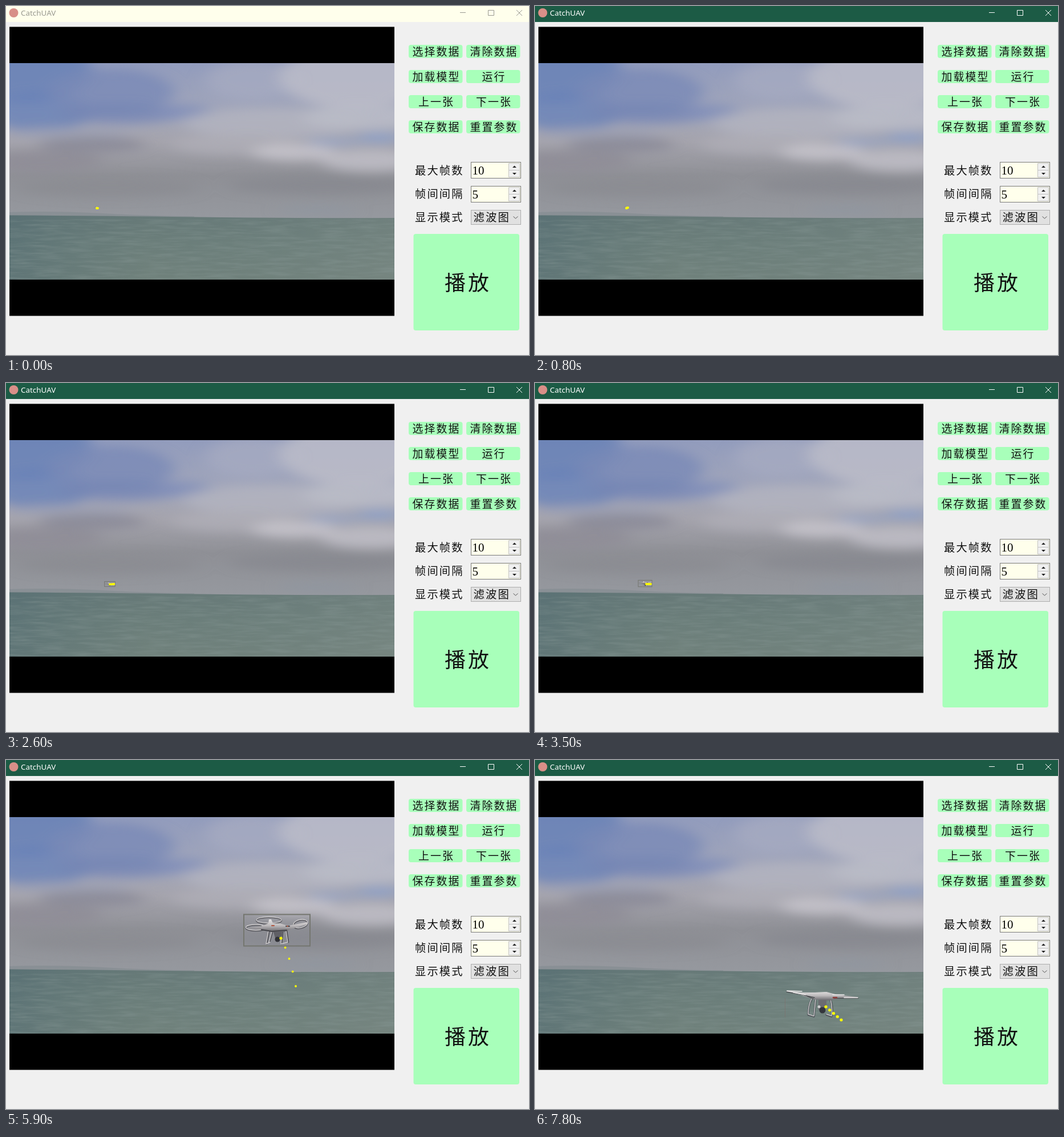
An HTML page for the animation above (8 s loop, 917 by 611 pixels).

```html
<!DOCTYPE html>
<html lang="zh-CN">
<head>
<meta charset="utf-8">
<title>CatchUAV</title>
<style>
html, body { margin: 0; width: 100%; height: 100%; overflow: hidden; background: #f0f0f0; }
svg { display: block; }
.cjk { font-family: "Noto Sans CJK SC", "Noto Sans CJK", sans-serif; font-weight: 300; fill: #111; }
.num { font: 21px "Liberation Serif", serif; }
.title { font: 13.4px "Noto Sans", sans-serif; }
</style>
</head>
<body>
<svg id="stage" width="917" height="611" viewBox="0 0 917 611">
  <defs>
    <clipPath id="photo"><rect x="6" y="100" width="675" height="379"/></clipPath>
    <filter id="soft" x="-60%" y="-100%" width="220%" height="300%"><feGaussianBlur stdDeviation="15 9"/></filter>
    <filter id="waves" x="0" y="0" width="100%" height="100%">
      <feTurbulence type="fractalNoise" baseFrequency=".02 .22" numOctaves="3" seed="4"/>
      <feColorMatrix values="0 0 0 0 .25  0 0 0 0 .32  0 0 0 0 .31  1.6 0 0 0 -.62"/>
    </filter>
    <linearGradient id="sky" x2="0" y2="1">
      <stop offset="0" stop-color="#929cbd"/>
      <stop offset=".33" stop-color="#a3a7ba"/>
      <stop offset=".5" stop-color="#a5a4ad"/>
      <stop offset=".72" stop-color="#8f9096"/>
      <stop offset="1" stop-color="#96999f"/>
    </linearGradient>
    <linearGradient id="sea" x2="0" y2="1">
      <stop offset="0" stop-color="#687a78"/>
      <stop offset=".45" stop-color="#6e807b"/>
      <stop offset="1" stop-color="#73837c"/>
    </linearGradient>
    <linearGradient id="seaSide">
      <stop offset="0" stop-color="#4f6a72" stop-opacity=".55"/>
      <stop offset=".35" stop-color="#5c7476" stop-opacity=".15"/>
      <stop offset="1" stop-color="#7b8985" stop-opacity=".4"/>
    </linearGradient>
    <linearGradient id="shell" x2="0" y2="1">
      <stop offset="0" stop-color="#e6e4e4"/>
      <stop offset=".5" stop-color="#bdbabc"/>
      <stop offset="1" stop-color="#66656a"/>
    </linearGradient>
    <path id="water" d="M6 366.5Q130 367 330 369.5T681 371V480H6Z"/>
  </defs>
  <rect width="917" height="611" fill="#f0f0f0"/>
  <rect x="6" y="36.5" width="675" height="506"/>
  <g clip-path="url(#photo)">
    <rect x="6" y="99" width="675" height="275" fill="url(#sky)"/>
    <g id="clouds" filter="url(#soft)"/>
    <path d="M6 361Q80 358 170 363T330 368V372H6Z" fill="#838b90" opacity=".6"/>
    <use href="#water" fill="url(#sea)"/>
    <use href="#water" fill="url(#seaSide)"/>
    <rect x="6" y="373" width="675" height="107" filter="url(#waves)" opacity=".5"/>

    <rect id="box" fill="none"/>
    <g id="guarded" fill="none" stroke-linecap="round" stroke-linejoin="round">
      <g id="guards" stroke="#58585e" stroke-width="2.6">
        <ellipse cx="438" cy="294" rx="17.5" ry="5"/>
        <ellipse cx="461" cy="281" rx="22" ry="5.5"/>
        <ellipse cx="516" cy="287.5" rx="13" ry="7" transform="rotate(-13 516 287)"/>
      </g>
      <g stroke="#d2d0d1" stroke-width="1.4">
        <ellipse cx="438" cy="293" rx="17.5" ry="5"/>
        <ellipse cx="461" cy="280" rx="22" ry="5.5"/>
        <ellipse cx="516" cy="286.5" rx="13" ry="7" transform="rotate(-13 516 286)"/>
      </g>
      <path d="M461 300L457 322M467 301L462 319M492 299L495 319M485 301L483 322" stroke="#4c4c52" stroke-width="2.6"/>
      <path d="M460 300L456 322M466 301L461 319M491 299L494 319M484 301L482 322M456 322L463 319M482 322L494 319" stroke="#cbc9cb" stroke-width="1.4"/>
      <path d="M424 294L447 291L460 286L461 279H465L468 286L480 286L494 290L528 284L529 287L500 296L488 301L465 301L448 297Z" fill="url(#shell)"/>
      <path d="M448 297L466 300L492 298M491 291H497" stroke="#45454a" stroke-width="2"/>
      <path d="M466 290H470M493 291H494" stroke="#b2563f" stroke-width="2"/>
      <path d="M469 301H485L483 312H472Z" fill="#606066"/>
      <circle cx="476" cy="314" r="4.5" fill="#303137"/>
    </g>
    <g id="bare" fill="none" stroke-linecap="round" stroke-linejoin="round">
      <path d="M485 419Q479 429 479 446L489 449M492 420L489 449M518 420Q523 432 520 449L511 446" stroke="#4b4f56" stroke-width="3.2"/>
      <path d="M485 418Q479 429 479 445L488 448M492 419L489 448M518 419Q522 432 520 448L511 445" stroke="#c9c8c9" stroke-width="1.5"/>
      <path d="M441 404L467 407L491 407L511 406L530 411L566 415V418L535 418L517 421L488 419L465 411L441 406Z" fill="url(#shell)"/>
      <path d="M441 406L470 411L488 418M472 412L490 416M524 417H567" stroke="#484c4f" stroke-width="1.3"/>
      <path d="M442 404L468 405M453 407L474 411M522 411H542M542 416H566" stroke="#eeecec" stroke-width="1.5"/>
      <path d="M523 416H529" stroke="#8d3935" stroke-width="2.5"/>
      <path d="M497 420H511V432L505 438H497Z" fill="#6b6c71"/>
      <circle cx="504" cy="438" r="5.5" fill="#34363c"/>
      <circle cx="498" cy="432" r="2.5" fill="#cfced0"/>
      <path d="M438.5 417V450" stroke="#806f6c" opacity=".6"/>
    </g>
    <g id="dots" fill="#ff0"/>
  </g>
  <rect id="bar" width="917" height="28"/>
  <circle cx="13.5" cy="12" r="8" fill="#d88f88"/>
  <text id="caption" class="title" x="26" y="17">CatchUAV</text>
  <path id="controls" d="M796 11.5H806M845.5 7.5H855.5V16.5H845.5ZM895 7L905 17M905 7L895 17" fill="none"/>
  <g id="panel"/>
</svg>
<script>
const LOOP = 8000;
const GREEN = '#a8ffba', RED = '#e6402e';
const $ = id => document.getElementById(id);

function set(node, attrs) {
  for (const key in attrs) node.setAttribute(key, attrs[key]);
}
function add(parent, tag, attrs, text) {
  const node = document.createElementNS('http://www.w3.org/2000/svg', tag);
  set(node, attrs);
  if (text) node.textContent = text;
  parent.append(node);
  return node;
}

// Soft cloud masses: cx, cy, rx, ry, colour
[
  [30, 110, 120, 60, '#6680b6'],
  [60, 185, 90, 36, '#6a83b8'],
  [185, 150, 110, 40, '#7a8ab7'],
  [200, 188, 110, 18, '#7686b5'],
  [310, 185, 50, 14, '#8290ba'],
  [430, 130, 80, 35, '#a6abc1'],
  [610, 125, 130, 55, '#bfbeca'],
  [470, 205, 160, 26, '#b3b4c0'],
  [630, 195, 110, 22, '#bcbdc9'],
  [110, 222, 110, 10, '#9da1b5'],
  [400, 242, 110, 18, '#b0aeb7'],
  [575, 238, 50, 8, '#98a5c6'],
  [655, 231, 40, 10, '#8da0cb'],
  [505, 256, 75, 15, '#c8c6ce'],
  [640, 270, 90, 20, '#c2c1ca'],
  [150, 243, 95, 14, '#898996'],
  [60, 272, 110, 18, '#8e8d96'],
  [560, 314, 170, 16, '#87898f'],
  [180, 318, 160, 16, '#8b8c92'],
  [545, 358, 70, 6, '#8e96a2']
].forEach(([cx, cy, rx, ry, fill]) =>
  add($('clouds'), 'ellipse', { cx, cy, rx, ry, fill, opacity: .8 }));

const panel = $('panel');
const rect = (x, y, width, height, fill, more) =>
  add(panel, 'rect', { x, y, width, height, fill, ...more });

// Characters sit on a fixed pitch, a little wider than the glyphs
function label(text, x, y, pitch) {
  const size = pitch * .9;
  add(panel, 'text', {
    class: 'cjk', x: x + (pitch - size) / 2, y, 'font-size': size, 'letter-spacing': pitch - size
  }, text);
}

[['选择数据', '清除数据'], ['加载模型', '运行'], ['上一张', '下一张'], ['保存数据', '重置参数']]
  .forEach((row, r) => row.forEach((text, c) => {
    const x = 706 + c * 101, y = 68 + r * 44;
    rect(x, y, 94.5, 23, GREEN, { rx: 4 });
    label(text, x + 47.5 - text.length * 10.5, y + 18.5, 21);
  }));

['最大帧数', '帧间间隔', '显示模式'].forEach((text, i) => label(text, 716, 294.5 + i * 41.3, 21.4));

function spinner(y, value) {
  rect(815.5, y + .5, 87, 28, '#ffffec', { stroke: '#7a7a7a' });
  add(panel, 'text', { class: 'num', x: 817.5, y: y + 22 }, value);
  return [2.5, 14.5].map((dy, i) => {
    const button = rect(881.5, y + dy, 19, 12, '#f0f0f0', { stroke: '#c3c3c3' });
    const tip = y + dy + (i ? 8 : 4), base = y + dy + (i ? 4.5 : 7.5);
    add(panel, 'path', { d: `M888 ${base}H895L891.5 ${tip}Z`, fill: '#222' });
    return button;
  });
}
const spinButtons = [spinner(273, '10')[0], spinner(315, '5')[1]];

const combo = rect(815.5, 357.5, 87, 25);
label('滤波图', 818.5, 377, 21.5);
add(panel, 'path', { d: 'M889.5 368.5L893.5 372L897.5 368.5', fill: 'none', stroke: '#555' });

const play = rect(714.5, 399, 185.5, 169, GREEN, { rx: 4 });
label('播放', 767, 498, 41);

const dots = Array.from({ length: 5 }, () => add($('dots'), 'circle', {}));

// Video picture changes, and the flight: t, x, y, width, first dot, last dot
const TICKS = [0, 800, 1200, 1700, 2100, 2600, 3100, 3500, 4000, 4500, 5000, 5400, 5900, 6400, 6900, 7300, 7800];
const FLIGHT = [
  [0, 160, 353, 11, 159, 354, 161, 354],
  [800, 161, 353, 11, 160, 354, 163, 353],
  [1700, 171, 353, 13, 169, 353, 176, 352],
  [3500, 193, 351, 24, 195, 352, 203, 352],
  [4500, 246, 340, 41, 248, 340, 265, 335],
  [5400, 388, 304, 82, 393, 311, 444, 298],
  [5900, 475, 298, 116, 482, 312, 508, 396],
  [6400, 512, 330, 125, 519, 342, 540, 410],
  [6900, 520, 370, 128, 527, 378, 535, 425],
  [7800, 503, 427, 127, 510, 432, 537, 455]
];

function flightAt(t) {
  const i = FLIGHT.findLastIndex(row => row[0] <= t);
  const a = FLIGHT[i], b = FLIGHT[i + 1] || a;
  const k = b === a ? 0 : (t - a[0]) / (b[0] - a[0]);
  return a.map((v, n) => v + (b[n] - v) * k);
}

function drawVideo(tick) {
  const [, x, y, w, sx, sy, ex, ey] = flightAt(tick);
  const bare = tick >= 6900, falling = tick >= 5900 && !bare;
  const show = on => on ? 'visible' : 'hidden';
  const place = (cx, cy, width) => `translate(${x} ${y}) scale(${w / width}) translate(${-cx} ${-cy})`;
  set($('guarded'), { transform: place(475, 298, 116), visibility: show(!bare) });
  set($('bare'), { transform: place(503, 427, 127), visibility: show(bare) });
  const h = w * .475;
  set($('box'), {
    x: x - w / 2, y: y - h / 2, width: w, height: h,
    stroke: '#74766f', 'stroke-width': w > 70 ? 2 : 1,
    visibility: show(!bare && tick >= 1200)
  });
  dots.forEach((dot, i) => {
    const k = i / 4, bend = falling ? k * (1 - k) : 0;
    set(dot, {
      cx: sx + (ex - sx) * (k + bend * .24),
      cy: sy + (ey - sy) * (k - bend * .29),
      r: bare || (falling && !i) ? 2.6 : 1.9
    });
  });
}

function drawWindow(t) {
  const active = t >= 600;
  const ink = active ? '#fff' : '#999991';
  set($('bar'), { fill: active ? '#1c5b45' : '#ffffec' });
  set($('caption'), { fill: ink });
  set($('controls'), { stroke: ink });
  spinButtons.forEach((button, i) => {
    const hover = t >= 100 * (i + 1) && t < 100 * (i + 2);
    set(button, { fill: hover ? '#e5f1fb' : '#f0f0f0', stroke: hover ? '#78b0dc' : '#c3c3c3' });
  });
  const [fill, stroke] = t >= 300 && t < 400 ? ['#e5f1fb', '#0078d7']
    : t >= 400 && t < 600 ? ['#dfe4e8', '#7fa6c3'] : ['#e1e1e1', '#adadad'];
  set(combo, { fill, stroke });
  set(play, { fill: t >= 400 && t < 800 ? RED : GREEN });
}

const start = performance.now();
function frame() {
  const t = (performance.now() - start) % LOOP;
  drawWindow(t);
  drawVideo(TICKS.findLast(tick => tick <= t));
  requestAnimationFrame(frame);
}
frame();
</script>
</body>
</html>
```
